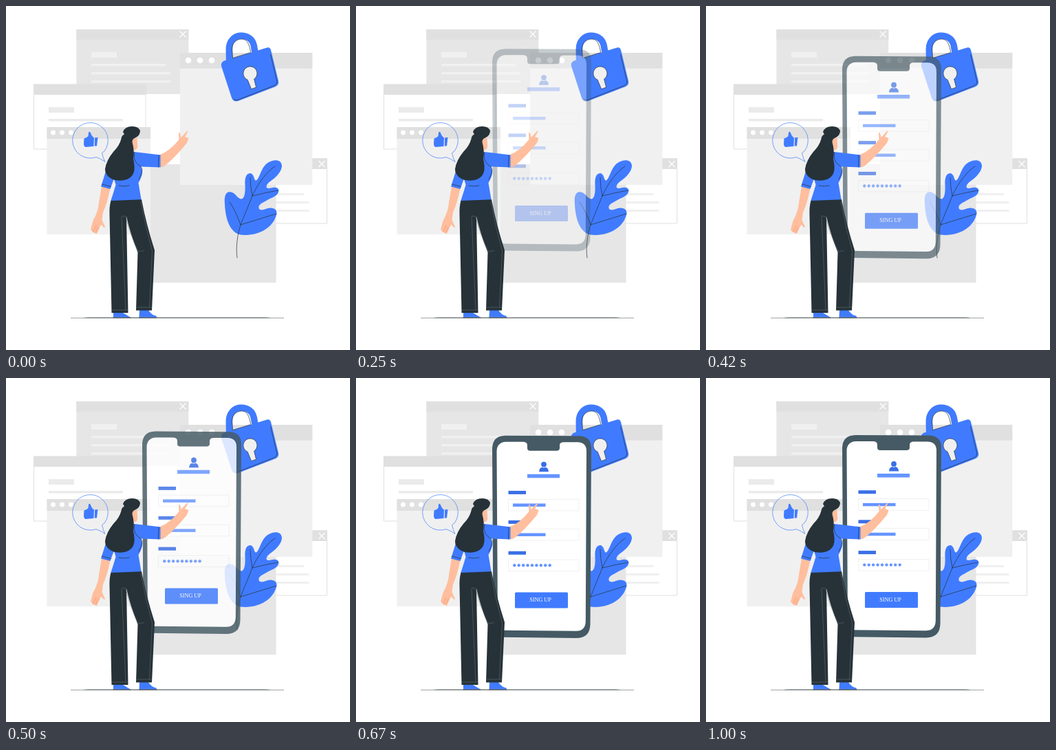
These frames come from a looping animation (500x500 px, 1.04 s). An HTML page:

```html
<!DOCTYPE html>
<html lang="en">
<head>
<meta charset="utf-8">
<title>Sign up</title>
<style>
  html, body { margin: 0; width: 100%; height: 100%; overflow: hidden; background: #fff; }
  svg { display: block; width: 100vw; height: 100vh; }
  .bar { fill: #e0e0e0; }
  .pane { fill: #f0f0f0; }
  .deep { fill: #e6e6e6; }
  .frame { fill: #fff; stroke: #e0e0e0; }
  .white { fill: #fff; }
  .blue { fill: #407bff; }
  .mid { fill: #6695ff; }
  .strong { fill: #3a6fe6; }
  .dark { fill: #263238; }
  .skin { fill: #ffbe9d; }
  .cross { fill: none; stroke: #fff; stroke-width: 1.2; }
  .ink { fill: none; stroke: #263238; stroke-width: .7; stroke-linecap: round; }
  .seam { fill: none; stroke: #66747a; stroke-width: .5; }
  .field { fill: #fff; stroke: #ededed; stroke-width: .8; }
  text { font: 8.2px "Liberation Serif", serif; fill: #fff; }
</style>
</head>
<body>
<svg viewBox="0 0 500 500">
  <!-- ground -->
  <path d="M94 453.5H404" stroke="#8a8f91" stroke-width=".8"/>
  <path d="M112 453.8Q115 452.5 121 452.5H376Q382 452.5 385 453.8Z" fill="#6f7678"/>

  <!-- browser windows -->
  <path class="deep" d="M102.400 34H265.300V128H102.400Z"/>
  <path class="bar" d="M102.400 34H265.300V49H102.400Z"/>
  <path class="pane" d="M124 67h37v8h-37zM124 84h108v3.5h-108zM124 96h115v3.5h-115zM124 108h115v3.5h-115z"/>
  <path class="cross" d="M252.500 36.500l9 9m0-9l-9 9"/>

  <path class="frame" d="M40.500 114.500H203V208H40.500Z"/>
  <path class="bar" d="M40 113.600H203.500V129H40Z"/>
  <path fill="#ebebeb" d="M62 147h37v8h-37zM62 164h108v3.500h-108z"/>

  <path class="frame" d="M372 222H466.500V316H372Z"/>
  <path class="bar" d="M372 221.500H467V237H372Z"/>
  <path class="pane" d="M380 272h53v3h-53zM380 284h60.500v3h-60.500zM380 296h60.500v3h-60.500z"/>
  <path class="cross" d="M454.500 225l9 9m0-9l-9 9"/>

  <path class="deep" d="M210 230H392.500V402.300H210Z"/>
  <path class="pane" d="M59.500 176H210V332H59.500Z"/>
  <path class="bar" d="M59.500 176H210V193H59.500Z"/>
  <g class="white"><circle cx="68.500" cy="184" r="3.400"/><circle cx="81.500" cy="184" r="3.400"/><circle cx="94.500" cy="184" r="3.400"/></g>

  <path class="pane" d="M253 68H445.300V260H253Z"/>
  <path class="bar" d="M253 68H445.300V90.700H253Z"/>
  <g class="white"><circle cx="265" cy="79" r="4.300"/><circle cx="282" cy="79" r="4.300"/><circle cx="299" cy="79" r="4.300"/></g>

  <!-- padlock -->
  <g transform="translate(-.4 .7)">
    <path d="M325 80L324.700 63C324 37.500 356 36.500 360.500 56L363 70" fill="none" stroke="#407bff" stroke-width="9.500"/>
    <path class="ink" d="M330 75L329 63C328.500 50 339 46.500 345 47.500C351 48.500 354 55 356 66"/>
    <path class="blue" d="M318.500 78.500L379 60Q384 58.500 385.500 63.500L396.300 108Q397.500 114 392 116.500L338 137.300Q331 139.300 328.500 133L313.500 87Q312 80.500 318.500 78.500Z"/>
    <path class="ink" d="M330 75L356 67M332 135.500Q334 137 338 135.500L389 115.500Q395 113 394 108L385 70"/>
    <path d="M351.500 106.500L357 120L364 117.500L361 105.500A10 10 0 1 0 351.500 106.500Z" fill="#f0f0f0" stroke="#263238" stroke-width=".7"/>
  </g>

  <!-- leaf -->
  <path class="blue" d="M327 270.500C319 269 317 277 318 288C319 309 325 329 341 332.500C360 335 383 327 391 309C396 299 393 294 385 293.500C378 293 373 299 368 295C365 289 373 286 380 282C387 278 396 276 396.500 268C395 262 388 264 383 265C376 266 378 259 384 255C393 249 401 240 401 232C400 222 389 223 382 227C371 233 370 247 364.500 253C360 256 362 245 355.500 243C348 243 347 252 347.500 260C348 270 347 280 342 280.500C336 280 334 271.500 327 270.500Z"/>
  <path class="ink" d="M336 366C333.500 350 337 330 341 318L358 276C367 256 380 240 391 233M341 318C337 307 331 293 325 285M341 318L393 302M358 276Q355 262 355 249M358 276Q378 271 395 268"/>

  <!-- speech bubble -->
  <path d="M131 219.700A25.800 25.800 0 1 1 143 211L139.500 213.500Q141 221 144 226.500Q138 222 131 219.700Z" fill="none" stroke="#407bff" stroke-width=".7"/>
  <path class="blue" d="M113.500 192.500Q118 191 119.500 189L120 184Q121.500 181.500 123 184.500Q124 188 126.500 190.500L128 191.500L127.500 204L115.500 205Q113 204 113 200ZM129 191.500L133.500 191L132 203.500L128.800 203.500Z"/>

  <g id="phone" opacity="0">
    <path fill="#455a64" d="M217 83.400L324 84Q342 84.400 342 102L340.500 357Q340.500 377.800 320 377.800L212 376.600Q200 375.500 199.500 357L198 102Q198.500 83.800 217 83.400Z"/>
    <path class="white" d="M218 92.400H242Q249 92.400 249 97.400V101.400Q249 105.400 253 105.400H291.500Q296 105.400 296 101.400V97.400Q296 92.900 302 92.900H322Q335 93.400 335 106L333.800 353Q333.500 367.600 320 367.600L216 366.600Q206 366 206 353L204.500 106Q205 92.900 218 92.400Z"/>
    <g class="strong">
      <circle cx="273" cy="125.300" r="3.900"/>
      <path d="M266 136Q266.500 129.500 271 129.500L273 130.500L275 129.500Q279.500 129.500 280 136Z"/>
    </g>
    <path class="mid" d="M249 139.500h47v5.500h-47z"/>
    <g id="form"></g>
    <rect class="blue" x="231" y="311.300" width="77" height="23" rx="1.500"/>
    <text x="268" y="325" text-anchor="middle">SING UP</text>
  </g>

  <!-- woman -->
  <path class="skin" d="M139 262L151.500 265Q147 287 141 300L139.500 311L144 321Q143 324 139 318L137.500 319L132 331L129 330L126.500 329L123 325L126.500 312Q134 299 135 286Z"/>
  <path class="ink" style="stroke:#f0946d" d="M131 319L127 328M134 321L130.500 329"/>
  <path class="skin" d="M224 216Q238 211 251.500 194L251 184Q253 182 254.500 191L264 181Q266 181 260 190L265.500 192L263 199Q245 221 231 232Q227 235 222 234Z"/>
  <path class="skin" d="M182 193L190.500 191.500L191.300 204Q191 209 186 209.500L184 220L176 214Z"/>
  <path class="blue" d="M156 446L170 446Q177 450 181 452.500H156ZM194 442L207 442Q211 449 218.500 450.500L219 452.500H193.500Z"/>
  <path class="ink" d="M156 453H181M193.500 453H219"/>
  <path class="blue" d="M146 237L138 262.500L151.500 266L157 251L159.500 260Q156 272 152 284H197L192.500 257Q199 246 198 239L196 233.500L224.500 234.500V216.500L186 212L160 215Z"/>
  <path class="dark" d="M152.500 283L197 281.300Q204 318 216 355L212 442.500H189L191.500 358Q181 332 175 306L177.500 446H153.500L150.500 303Q150 291 152.500 283Z"/>
  <path class="seam" d="M168 305L174 306Q180 333 192.500 357L201 355.500M168 306L174 442M196 284Q203 322 212.500 356L208.500 438M154 442H177M189.500 438H212"/>
  <path class="ink" d="M186.500 213Q184 227 196 233.500Q201 238 193 252M164 261Q171 263 179 261M222 217L221.500 234M139.500 259L152.500 262.500"/>
  <path class="dark" d="M170 183Q173 175 183 175Q192 174.500 195 181Q195 188 189 191Q183 193 183.500 198Q187 210 185 222C187 232 188 241 183 247Q175 256 158 253Q144 248 144 237Q146 224 156 212Q165 203 167.500 193Q168 188 172 186.500Z"/>
</svg>
<script>
const LOOP = 1040, STEPS = 25, FPS = 24, DROP = 30, REST = -.4;
const phone = document.getElementById('phone');
const rect = (cls, x, y, w, h) => `<rect class="${cls}" x="${x}" y="${y}" width="${w}" height="${h}"/>`;

let form = '';
[163.7, 206.7, 251.5].forEach((y, i) => {
  form += rect('strong', 221.5, y, 25.5, 5) + rect('field', 221.5, y + 12.3, 102.5, 16.7);
  if (i < 2) form += rect('mid', 228, y + 18.5, 47.5, 4.5);
  else for (let n = 0; n < 9; n++) form += `<circle class="mid" cx="${230.3 + n * 6.42}" cy="${y + 20.5}" r="2.2"/>`;
});
document.getElementById('form').innerHTML = form;

// cubic-bezier(.36, -.01, .5, 1.38)
const bezier = (a, b, s) => 3 * a * s * (1 - s) ** 2 + 3 * b * s * s * (1 - s) + s ** 3;
function ease(p) {
  let lo = 0, hi = 1;
  for (let i = 0; i < 30; i++) {
    const mid = (lo + hi) / 2;
    if (bezier(.36, .5, mid) < p) lo = mid; else hi = mid;
  }
  return bezier(-.01, 1.38, lo);
}

function draw(now) {
  const step = Math.floor((now % LOOP + 5) / (LOOP / STEPS)) % STEPS;
  const e = ease(Math.min(1, (step + 1) / FPS));
  phone.setAttribute('opacity', step < 2 ? 0 : Math.min(1, e));
  phone.setAttribute('transform', `translate(0 ${DROP * (e - 1) + REST})`);
}

const start = performance.now();
(function tick() {
  draw(performance.now() - start);
  requestAnimationFrame(tick);
})();
</script>
</body>
</html>
```
